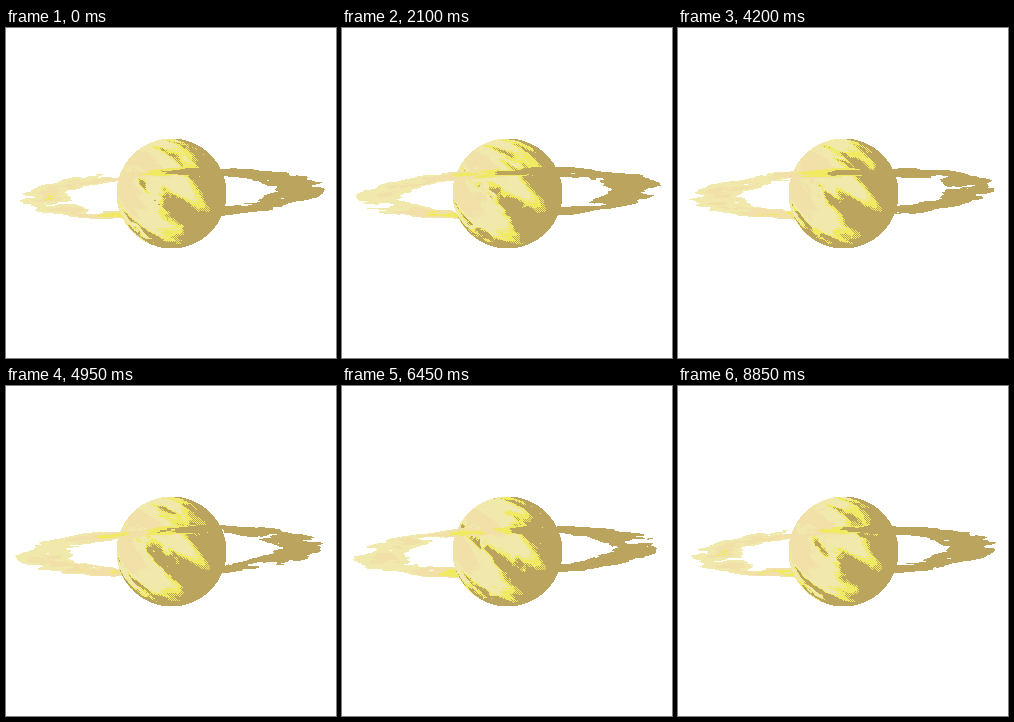
An HTML page with a canvas that plays this animation: 330x330 px, repeating every 9000 ms.

```html
<!DOCTYPE html>
<html lang="en">
<head>
<meta charset="utf-8">
<title>Ringed planet</title>
<style>
html, body { margin: 0; width: 100%; height: 100%; overflow: hidden; background: #fff; }
canvas { display: block; width: 330px; height: 330px; image-rendering: pixelated; }
</style>
</head>
<body>
<canvas id="stage" width="330" height="330"></canvas>
<script>
const STAGE = 330, BALL = 110, INSET = 110;
const LOOP = 9000, STEPS = 60;
const SEED = 6.314;
const TILT = 2.48, RING_TILT = TILT + 0.7;
const LIGHT = [-0.1, 0.3];
const CREAM = [241, 224, 168], PALE = [241, 232, 172], YELLOW = [240, 234, 98], TAN = [186, 164, 94];

const ctx = document.getElementById('stage').getContext('2d');
const image = ctx.createImageData(STAGE, STAGE);

const mod = (a, n) => ((a % n) + n) % n;
const fract = v => v - Math.floor(v);
const smooth = (a, b, v) => {
  const t = Math.min(1, Math.max(0, (v - a) / (b - a)));
  return t * t * (3 - 2 * t);
};
const rotate = (x, y, angle) => {
  const c = Math.cos(angle), s = Math.sin(angle);
  x -= 0.5; y -= 0.5;
  return [x * c - y * s + 0.5, x * s + y * c + 0.5];
};

// Value noise that repeats every 2n by n cells.
function makeNoise(n, octaves) {
  const cells = Array.from({ length: 2 * n * n }, (_, i) =>
    fract(Math.sin((i % (2 * n)) * 12.9898 + Math.floor(i / (2 * n)) * 78.233) * 15.5453 * SEED));
  const rand = (x, y) => cells[mod(y, n) * 2 * n + mod(x, 2 * n)];
  const noise = (x, y) => {
    const ix = Math.floor(x), iy = Math.floor(y);
    let u = x - ix, v = y - iy;
    u *= u * (3 - 2 * u);
    v *= v * (3 - 2 * v);
    const top = rand(ix, iy) * (1 - u) + rand(ix + 1, iy) * u;
    const low = rand(ix, iy + 1) * (1 - u) + rand(ix + 1, iy + 1) * u;
    return top + (low - top) * v;
  };
  const fbm = (x, y) => {
    let sum = 0;
    for (let o = 0, k = 0.5; o < octaves; o++, k /= 2, x *= 2, y *= 2) sum += noise(x, y) * k;
    return sum;
  };
  return { rand, fbm };
}

const GAS = 10.107, RING = 15;
const gas = makeNoise(10, 3), dust = makeNoise(15, 4);

function swirl(x, y) {
  const row = Math.floor(y);
  x += row * 0.31;
  const h = gas.rand(Math.floor(x), row);
  const d = Math.hypot(fract(x) - 0.25 - h / 2, fract(y) - 0.25 - h / 2);
  return smooth(0, h * 0.25, d * 0.75);
}

// Everything that does not depend on time is worked out once.
const ball = [], ring = [];

for (let py = 0; py < BALL; py++) for (let px = 0; px < BALL; px++) {
  const x = px / BALL, y = py / BALL;
  if (Math.hypot(x - 0.5, y - 0.5) > 0.49999) continue;
  const [rx, ry] = rotate(x, y, TILT);
  const cx = rx * 2 - 1, cy = ry * 2 - 1;
  const z = Math.sqrt(Math.max(0, 1 - cx * cx - cy * cy));
  const u = cx / (z + 1) / 2 + 0.5, v = cy / (z + 1) / 2 + 0.5;
  ball.push({
    at: (py + INSET) * STAGE + px + INSET,
    u, v,
    shade: Math.hypot(x - LIGHT[0], y - LIGHT[1]),
    boost: (px + py) % 2 ? 1 : 1.1,
    band: gas.fbm(0, v * GAS * 0.892) ** 2 * 7,
    warp: gas.fbm(u * GAS, v * GAS)
  });
}

for (let py = 0; py < STAGE; py++) for (let px = 0; px < STAGE; px++) {
  const x = px / STAGE, y = py / STAGE;
  const [rx, ry] = rotate(x, y, RING_TILT);
  if (ry < 0.5 && Math.hypot(rx - 0.5, ry - 0.5) < 1 / 6) continue;
  const cy = (ry - 0.5) * 6, d = Math.hypot(rx - 0.5, cy);
  const body = smooth(0.246, 0.373, d) * smooth(d - 0.127, d, 0.4);
  if (body < 0.28) continue;
  const glow = Math.hypot(x - LIGHT[0], y - LIGHT[1]) ** 2 * 2;
  ring.push({ at: py * STAGE + px, x: rx, y: cy + 0.5, body, glow });
}

function plot(at, color) {
  image.data.set(color, at * 4);
  image.data[at * 4 + 3] = 255;
}

function drawBall(t) {
  const drift = t * 20;
  for (const p of ball) {
    let turb = 0;
    for (let i = 11; i <= 20; i++) turb += swirl(p.u * GAS * 0.3 + i + drift, p.v * GAS * 0.3 + i);
    const cloud = p.band * gas.fbm(p.u * GAS + p.warp - drift + turb, p.v * 2 * GAS + p.warp + turb);
    const tone = smooth(-0.2, 4.3 - cloud - p.shade, cloud + p.shade * 1.8) * p.boost;
    plot(p.at, tone < 0.25 ? CREAM : tone < 0.5 ? PALE : tone < 0.625 ? YELLOW : TAN);
  }
}

function drawRing(t) {
  for (const p of ring) {
    const [x, y] = rotate(p.x, p.y, t * 2 * Math.PI);
    const mass = p.body * dust.fbm(x * RING, y * RING);
    if (mass < 0.28) continue;
    const tone = mass + p.glow;
    plot(p.at, tone < 0.75 ? PALE : tone < 1 ? CREAM : tone < 1.25 ? YELLOW : TAN);
  }
}

let shown = -1;
function frame(now) {
  const step = Math.floor(now % LOOP / LOOP * STEPS);
  if (step !== shown) {
    shown = step;
    image.data.fill(0);
    drawBall(step / STEPS);
    drawRing(step / STEPS);
    ctx.putImageData(image, 0, 0);
  }
  requestAnimationFrame(frame);
}
frame(performance.now());
</script>
</body>
</html>
```
